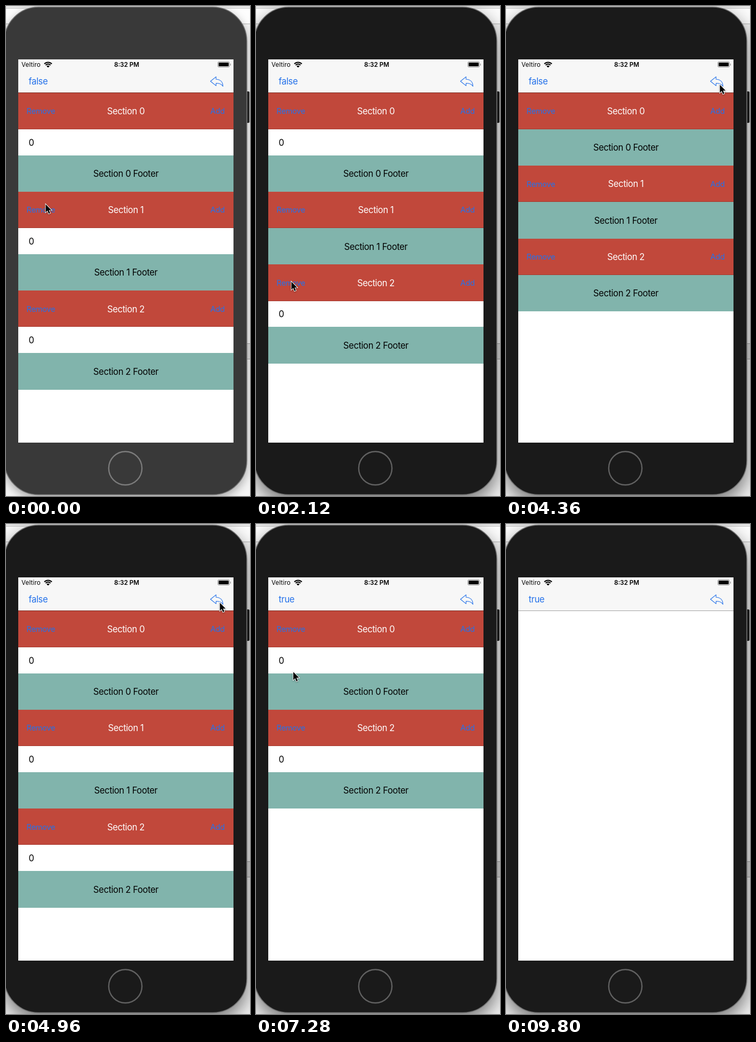
Write an HTML page with a canvas that moves like this. It is 458x918 px and loops after 9880 ms.

```html
<!DOCTYPE html>
<html lang="en">
<head>
<meta charset="utf-8">
<title>Table sections</title>
<style>
html, body { margin: 0; width: 100%; height: 100%; overflow: hidden; background: #f2f2f2; }
canvas { display: block; width: 458px; height: 918px; }
</style>
</head>
<body>
<canvas id="stage"></canvas>
<script>
const W = 458, H = 918, LOOP = 9880;
const canvas = document.getElementById('stage');
const c = canvas.getContext('2d');
const dpr = window.devicePixelRatio || 1;
canvas.width = W * dpr;
canvas.height = H * dpr;

const FONT = 'Inter, Roboto, sans-serif';
const BLUE = '#2471ea', RED = '#c1483b', GREEN = '#81b4ac';
const LEFT = 23, RIGHT = 427, TOP = 100, BOTTOM = 818;
const LIST_TOP = 162.4, BAR = 68.3, ROW = 48.8;
const SLIDE = 300, FOCUS = 280, RESTORE = 4440, TOGGLE = 5700;

// Row removal and section removal times
const sections = [
  { id: 0, row: 3180, gone: 7640 },
  { id: 1, row: 400, gone: 6480 },
  { id: 2, row: 2180, gone: 8300 }
];

// Pointer stops: time, x, y
const stops = [
  [0, 74, 371], [120, 74, 371], [300, 69, 380], [1100, 69, 380],
  [1700, 66, 516], [2400, 66, 516], [2960, 75, 192], [3540, 75, 192],
  [4300, 401, 147], [5100, 401, 147], [5640, 67, 140], [6000, 67, 140],
  [6400, 69, 382], [7060, 69, 382], [7472, 70, 192], [9000, 70, 192],
  [9400, 10, 200]
];

const ease = p => p <= 0 ? 0 : p >= 1 ? 1 : p * p * (3 - 2 * p);
const ramp = (t, start) => ease((t - start) / SLIDE);

function box(x, y, w, h, fill) {
  c.fillStyle = fill;
  c.fillRect(x, y, w, h);
}

function text(s, x, y, size, color, align = 'left', spacing = 0, weight = 400) {
  c.font = `${weight} ${size}px ${FONT}`;
  c.letterSpacing = spacing + 'px';
  c.textAlign = align;
  c.fillStyle = color;
  c.fillText(s, x, Math.round(y));
}

const label = (s, x, y, color, align) => text(s, x, y, 16.6, color, align, -0.4);

function round(x, y, w, h, r) {
  c.beginPath();
  c.roundRect(x, y, w, h, r);
}

function desktop() {
  box(0, 0, W, H, '#f4f4f4');
  box(0, 0, W, 4, '#e6e6e6');
  box(0, 4, W, 1, '#c9c9c9');
  box(0, 5, W, 28, '#fdfdfd');
  box(0, 33, W, 1, '#b4b4b4');
  box(440, 632, 18, 30, '#dedede');
  box(440, 632, 18, 1, '#a2a2a2');
  box(440, 661, 18, 1, '#a2a2a2');
}

function phone(active) {
  const body = active ? '#1a1a1a' : '#393939';
  c.save();
  c.shadowColor = active ? 'rgba(0,0,0,.55)' : 'rgba(0,0,0,.35)';
  c.shadowBlur = (active ? 36 : 18) * dpr;
  c.shadowOffsetY = (active ? 14 : 6) * dpr;
  round(-3, 2, 455, 913.5, 64);
  c.fillStyle = body;
  c.fill();
  c.restore();

  round(449, 160, 8, 59, 2);
  c.fillStyle = active ? '#161616' : '#242424';
  c.fill();

  round(-3, 2, 455, 913.5, 64);
  c.fillStyle = body;
  c.fill();
  c.strokeStyle = '#707070';
  c.lineWidth = 1.6;
  c.stroke();

  c.beginPath();
  c.arc(224, 866, 31.2, 0, Math.PI * 2);
  c.strokeStyle = active ? '#616161' : '#7b7b7b';
  c.lineWidth = 2.4;
  c.stroke();
}

function wifi() {
  c.save();
  c.beginPath();
  c.moveTo(79, 115.5);
  c.lineTo(70.5, 107);
  c.lineTo(70.5, 100);
  c.lineTo(87.5, 100);
  c.lineTo(87.5, 107);
  c.closePath();
  c.clip();
  c.strokeStyle = '#000';
  c.lineWidth = 2;
  for (const r of [9.6, 6.2]) {
    c.beginPath();
    c.arc(79, 115, r, Math.PI, Math.PI * 2);
    c.stroke();
  }
  c.beginPath();
  c.arc(79, 115, 3.6, Math.PI, Math.PI * 2);
  c.fillStyle = '#000';
  c.fill();
  c.restore();
}

function battery() {
  round(397.5, 104.5, 22, 10, 2.5);
  c.strokeStyle = '#8c8c8c';
  c.lineWidth = 1;
  c.stroke();
  round(399, 106, 19, 7, 1.2);
  c.fillStyle = '#000';
  c.fill();
  box(421, 108, 1, 3.5, '#8c8c8c');
}

function replyIcon(alpha) {
  c.save();
  c.globalAlpha = alpha;
  c.beginPath();
  c.moveTo(383.8, 141);
  c.lineTo(394.3, 132.6);
  c.lineTo(394.3, 137.2);
  c.bezierCurveTo(402, 137.4, 407, 142, 407.2, 150.4);
  c.bezierCurveTo(404.5, 146, 400.5, 144.6, 394.3, 144.7);
  c.lineTo(394.3, 149.4);
  c.closePath();
  c.strokeStyle = BLUE;
  c.lineWidth = 1.1;
  c.lineJoin = 'round';
  c.stroke();
  c.restore();
}

function navBar(t) {
  box(LEFT, TOP, RIGHT - LEFT, 62, '#f7f7f7');
  box(LEFT, 162, RIGHT - LEFT, 1, 'rgba(0,0,0,.36)');
  text('Veltiro', 29, 114, 11.7, '#000', 'left', 0.1);
  text('8:32 PM', 226.5, 114, 11.7, '#000', 'center', 0, 600);
  wifi();
  battery();
  label(t < TOGGLE ? 'false' : 'true', 42.5, 147, BLUE);
  const pressed = t >= RESTORE - 60 && t < RESTORE + 160;
  replyIcon(pressed ? 0.25 + 0.75 * ease((t - RESTORE) / 160) : 1);
}

function bar(y, fill) {
  const a = Math.round(y), b = Math.round(y + BAR);
  box(LEFT, a, RIGHT - LEFT, b - a, fill);
}

function section(s, y, rowShare, alpha) {
  const rowY = y + BAR, footY = rowY + ROW * rowShare;
  c.save();
  c.globalAlpha = alpha;
  box(LEFT, Math.round(rowY), RIGHT - LEFT, Math.round(footY) - Math.round(rowY), '#fff');
  if (rowShare > 0) {
    c.globalAlpha = alpha * rowShare;
    label('0', 42.5, rowY + ROW / 2 + 6.4, '#000');
    c.globalAlpha = alpha;
  }
  bar(y, RED);
  box(LEFT, Math.round(rowY) - 1, RIGHT - LEFT, 1, 'rgba(60,0,0,.2)');
  const mid = y + BAR / 2 + 6.3;
  label('Section ' + s.id, 225, mid, '#fff', 'center');
  text('Remove', 38.5, mid - 0.8, 14.7, BLUE, 'left', -0.35);
  text('Add', 410.5, mid - 0.8, 14.7, BLUE, 'right', -0.35);
  bar(footY, GREEN);
  label(`Section ${s.id} Footer`, 225, footY + BAR / 2 + 6.3, '#000', 'center');
  c.restore();
}

function list(t) {
  let y = LIST_TOP;
  for (const s of sections) {
    const rowShare = 1 - ramp(t, s.row) + ramp(t, RESTORE);
    const share = 1 - ramp(t, s.gone);
    if (share <= 0) continue;
    section(s, y, rowShare, share);
    y += share * (2 * BAR + rowShare * ROW);
  }
}

function pointerAt(t) {
  let i = 0;
  while (i < stops.length - 2 && t >= stops[i + 1][0]) i++;
  const [t0, x0, y0] = stops[i], [t1, x1, y1] = stops[i + 1];
  const p = ease((t - t0) / (t1 - t0));
  return [x0 + (x1 - x0) * p, y0 + (y1 - y0) * p];
}

function pointer(t) {
  if (t >= 9400) return;
  const [x, y] = pointerAt(t);
  c.save();
  c.translate(x, y);
  c.beginPath();
  c.moveTo(0.5, 0.5);
  c.lineTo(0.5, 15.5);
  c.lineTo(3.9, 12.3);
  c.lineTo(6.3, 18);
  c.lineTo(8.8, 17);
  c.lineTo(6.4, 11.4);
  c.lineTo(11.2, 11.4);
  c.closePath();
  c.shadowColor = 'rgba(0,0,0,.35)';
  c.shadowBlur = 3 * dpr;
  c.shadowOffsetY = dpr;
  c.strokeStyle = '#fff';
  c.lineWidth = 1.8;
  c.stroke();
  c.shadowColor = 'transparent';
  c.fillStyle = '#000';
  c.fill();
  c.restore();
}

function draw(t) {
  c.setTransform(dpr, 0, 0, dpr, 0, 0);
  desktop();
  phone(t >= FOCUS);
  c.save();
  c.beginPath();
  c.rect(LEFT, TOP, RIGHT - LEFT, BOTTOM - TOP);
  c.clip();
  box(LEFT, TOP, RIGHT - LEFT, BOTTOM - TOP, '#fff');
  list(t);
  navBar(t);
  c.restore();
  pointer(t);
}

const start = performance.now();
function tick() {
  draw((performance.now() - start) % LOOP);
  requestAnimationFrame(tick);
}
tick();
</script>
</body>
</html>
```
